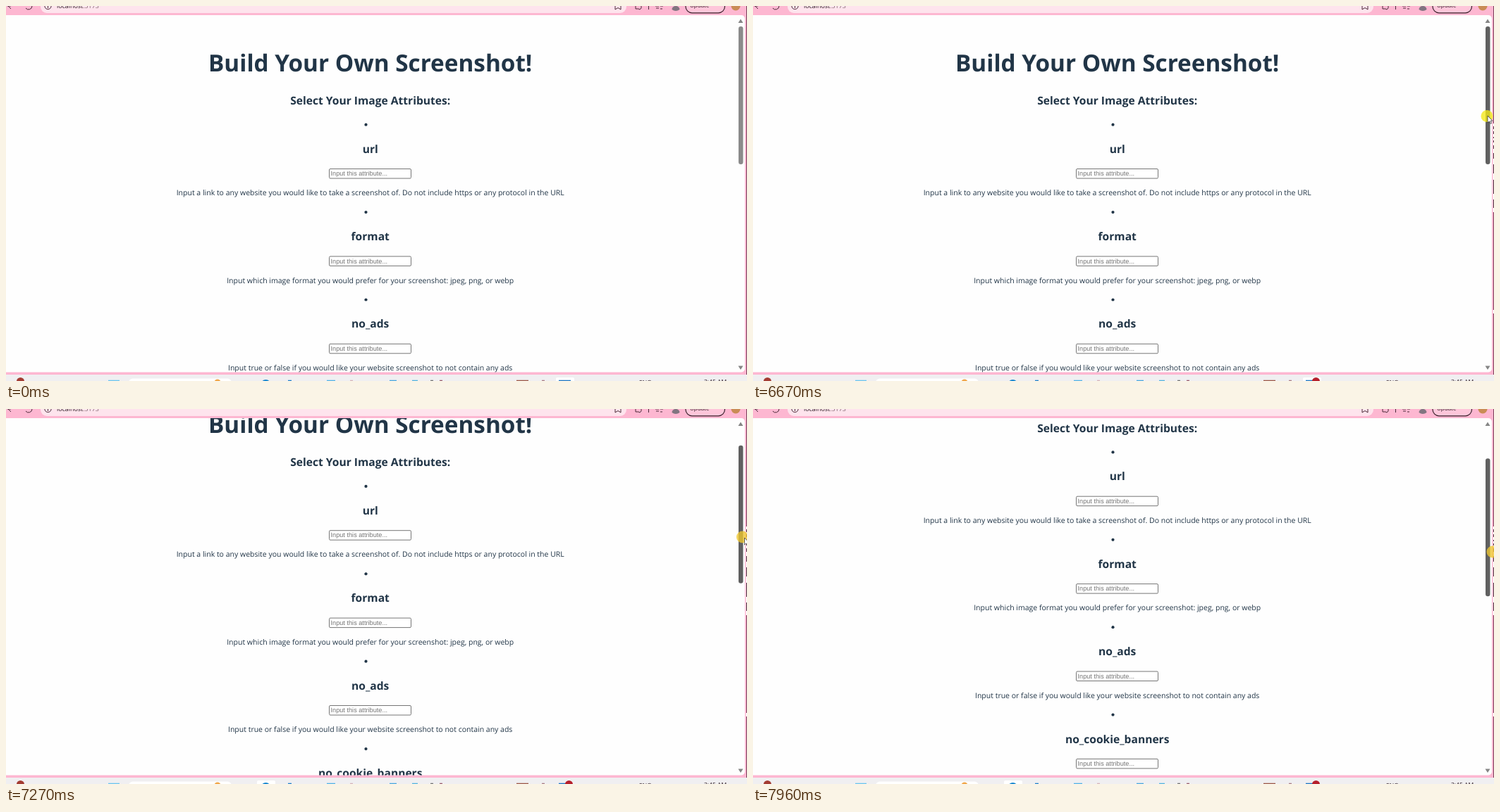
Write an HTML page that moves like this. It is 1051 by 533 pixels and loops after 8000 ms.

```html
<!DOCTYPE html>
<html lang="en">
<head>
<meta charset="utf-8">
<title>Build Your Own Screenshot!</title>
<style>
  html, body { margin: 0; width: 100%; height: 100%; overflow: hidden; background: #fff; }
  svg { display: block; }
  text { font: 10.5px "Open Sans", "Noto Sans", sans-serif; fill: #213547; text-rendering: geometricPrecision; }
  #page text { text-anchor: middle; }
  #page .h1 { font-size: 33.3px; font-weight: 700; }
  #page .h2 { font-size: 15.6px; font-weight: 700; }
  #page .hint { font: 9.19px "Liberation Sans", Arial, sans-serif; fill: #757575; text-anchor: start; }
  .small { font-size: 8.9px; fill: #2b1a22; }
  .icon { fill: none; stroke: #4a2a38; stroke-width: 1; }
</style>
</head>
<body>
<svg width="1051" height="533" viewBox="0 0 1051 533">
  <defs><clipPath id="view"><rect x="-8" y="13" width="1056" height="507.5" rx="5"/></clipPath></defs>
  <rect width="1051" height="533" fill="#fdb7d1"/>

  <g id="toolbar">
    <rect x="49" y="-12" width="831" height="22" rx="9" fill="#fee4ed"/>
    <path class="icon" d="M7 0H2M2 -1L7 4M28 3A5 5 0 0 0 37 0M59.500 -2V3"/>
    <circle class="icon" cx="59.5" cy="0" r="4.6"/>
    <text class="small" x="72" y="2.8">localhost<tspan fill="#806570">:5173</tspan></text>
    <path class="icon" d="M864 -1V5L868 2.500L872 5V-1M893 0V4H897L899 5L901 3V0M911.500 0V5M921 0H926M922 3H926M928 0H932M928 4H931"/>
    <path d="M944.500 5A5.500 5 0 0 1 955.500 5Q950 9 944.500 5Z" fill="#817580"/>
    <rect x="964" y="-10" width="55.500" height="19.800" rx="9" fill="#fec6da" stroke="#38202b" stroke-width="1.200"/>
    <text class="small" x="970" y="2.200" style="font-size:8px">Update</text>
    <circle cx="1035" cy="0" r="6.500" fill="#c98c55"/>
  </g>

  <g clip-path="url(#view)">
    <rect y="13" width="1048" height="508" fill="#fefefe"/>
    <g id="page"></g>
    <path d="M1038.500 24H1045.500L1042 18.500ZM1038.500 511.500H1045.500L1042 517Z" fill="#858585"/>
    <rect id="thumb" x="1039" width="6.500" height="196" rx="3.250"/>
  </g>

  <rect x="1050" y="0" width="1" height="524" fill="#79405a"/>
  <g id="edge">
    <rect x="1049.500" y="167" width="1.500" height="126" fill="#fff"/>
    <path d="M1050.500 171V175M1050.500 178V182M1050.500 186V188M1050.500 191V194M1050.500 198V203M1050.500 209V217M1050.500 225V238M1050.500 247V267M1050.500 275V287" stroke="#4b2838"/>
  </g>
  <rect id="notch" x="1049.500" y="432" width="1.500" height="5" fill="#fff"/>

  <g id="taskbar">
    <rect y="524" width="1051" height="9" fill="#f0eff1"/>
    <rect id="active" y="528" width="26" height="8" rx="2" fill="#fff"/>
    <rect x="174" y="529.500" width="146" height="12" rx="6" fill="#fff"/>
    <circle cx="20.500" cy="533.500" r="5.500" fill="#a33c32"/>
    <circle cx="300" cy="535" r="4.500" fill="#f0a64a"/>
    <circle cx="368.500" cy="538" r="7" fill="#1687cf"/>
    <g id="apps"></g>
    <circle id="badge" cx="798.500" cy="533.500" r="5.500" fill="#b51f2b"/>
    <text class="small" x="898" y="538" style="font-size:8.500px">ENG</text>
    <text class="small" x="990" y="537" style="font-size:8.500px">3:45 AM</text>
  </g>

  <circle id="glow" r="8.500"/>
  <path id="cursor" d="M0 0V10L2.400 7.900L4 11.300L5.600 10.500L4 7.300H7Z" fill="#fff" stroke="#222" stroke-width=".7"/>
</svg>
<script>
const $ = id => document.getElementById(id);
const MID = 516.7, PITCH = 124.4;

const label = (cls, y, str) => `<text class="${cls}" x="${MID}" y="${y}">${str}</text>`;
const items = [
  ['url', 'Input a link to any website you would like to take a screenshot of. Do not include https or any protocol in the URL'],
  ['format', 'Input which image format you would prefer for your screenshot: jpeg, png, or webp'],
  ['no_ads', 'Input true or false if you would like your website screenshot to not contain any ads'],
  ['no_cookie_banners', '']
];
$('page').innerHTML = label('h1', 92.7, 'Build Your Own Screenshot!') +
  label('h2', 140, 'Select Your Image Attributes:') +
  items.map(([name, help], i) => `<g transform="translate(0 ${i * PITCH})">
    <circle cx="510.500" cy="168.700" r="2.100" fill="#213547"/>
    ${label('h2', 208.700, name)}
    <rect x="458.500" y="231.500" width="116" height="13.500" rx="1.500" fill="#fff" stroke="#767676"/>
    <text class="hint" x="460.500" y="241.300">Input this attribute...</text>
    ${label('', 269.200, help)}</g>`).join('');

// Visible tops of the taskbar icons: x, width, colour
$('apps').innerHTML = [
  [145, 16, '#6dc5ee'], [400, 5, '#2583c9'], [455, 12, '#55b4e6'], [488, 4, '#d5b5bb'],
  [544, 10, '#4ca9df'], [576, 8, '#56b5df'], [602, 4, '#777'], [615, 4, '#9b6170'],
  [724, 17, '#9d5b4b'], [760, 4, '#aa8087'], [784, 17, '#2278c4']
].map(([x, w, c]) => `<rect x="${x}" y="531.700" width="${w}" height="3" fill="${c}"/>`).join('');

// Bursts of motion: start, end, intervals; the picture holds between them
const bursts = [
  [70, 440, 4], [890, 1170, 4], [1430, 1920, 7], [2200, 2450, 4], [2590, 2790, 3],
  [6670, 7060, 6], [7060, 7270, 3], [7270, 7420, 2], [7760, 7960, 3]
];
function snap(t) {
  let held = 0;
  for (const [a, b, n] of bursts) {
    if (t < a) break;
    const step = (b - a) / n;
    held = t >= b ? b : a + Math.floor((t - a) / step + 0.01) * step;
  }
  return held;
}

// Linear interpolation over [time, value...] keys
function track(keys, t) {
  const i = keys.findIndex(k => k[0] > t);
  if (i < 0) return keys[keys.length - 1].slice(1);
  if (!i) return keys[0].slice(1);
  const a = keys[i - 1], b = keys[i], f = (t - a[0]) / (b[0] - a[0]);
  return a.slice(1).map((v, j) => v + (b[j + 1] - v) * f);
}
const scrollKeys = [[6670, 0], [6800, 3], [7060, 30.8], [7270, 58.8], [7420, 68], [7760, 71], [7830, 83], [7960, 107.3]];
const cursorKeys = [
  [890, 1046, 524], [1170, 1036, 307], [1430, 1037, 294], [1640, 1041, 215], [1920, 1047, 179],
  [2200, 1046, 172], [2450, 1044, 158], [2590, 1043, 157], [2790, 1042, 156], [6670, 1042, 156],
  [6800, 1042, 158], [7060, 1043, 172], [7270, 1047.5, 183], [7420, 1048, 187], [7760, 1048, 188],
  [7830, 1047.5, 191], [7960, 1052, 203]
];
const glowKeys = [[6670, 1041, 156.5], [6800, 1041, 158.5], [7060, 1042, 172], [7270, 1044.5, 182], [7420, 1045.5, 187], [7760, 1046, 188], [7830, 1047, 191], [7960, 1049, 203]];

const show = (id, on) => $(id).setAttribute('visibility', on ? 'visible' : 'hidden');
const move = (id, x, y) => $(id).setAttribute('transform', `translate(${x} ${y})`);

function draw(now) {
  const t = snap(now % 8000);
  const [scroll] = track(scrollKeys, t);
  move('page', 0, -scroll);
  $('thumb').setAttribute('y', 29 + scroll * 0.385);
  $('thumb').setAttribute('fill', t < 1640 ? '#8b8b8b' : '#606060');
  move('cursor', ...track(cursorKeys, t));
  move('glow', ...track(glowKeys, t));
  $('glow').setAttribute('fill', t < 6900 ? 'rgba(244,232,20,.78)' : 'rgba(238,198,48,.78)');
  $('active').setAttribute('x', t < 6800 ? 780 : 356);
  show('cursor', t >= 890);
  show('glow', t >= 6670);
  show('badge', t >= 70);
  show('notch', t >= 1030);
  show('edge', t >= 1640);
  requestAnimationFrame(draw);
}
requestAnimationFrame(draw);
</script>
</body>
</html>
```
